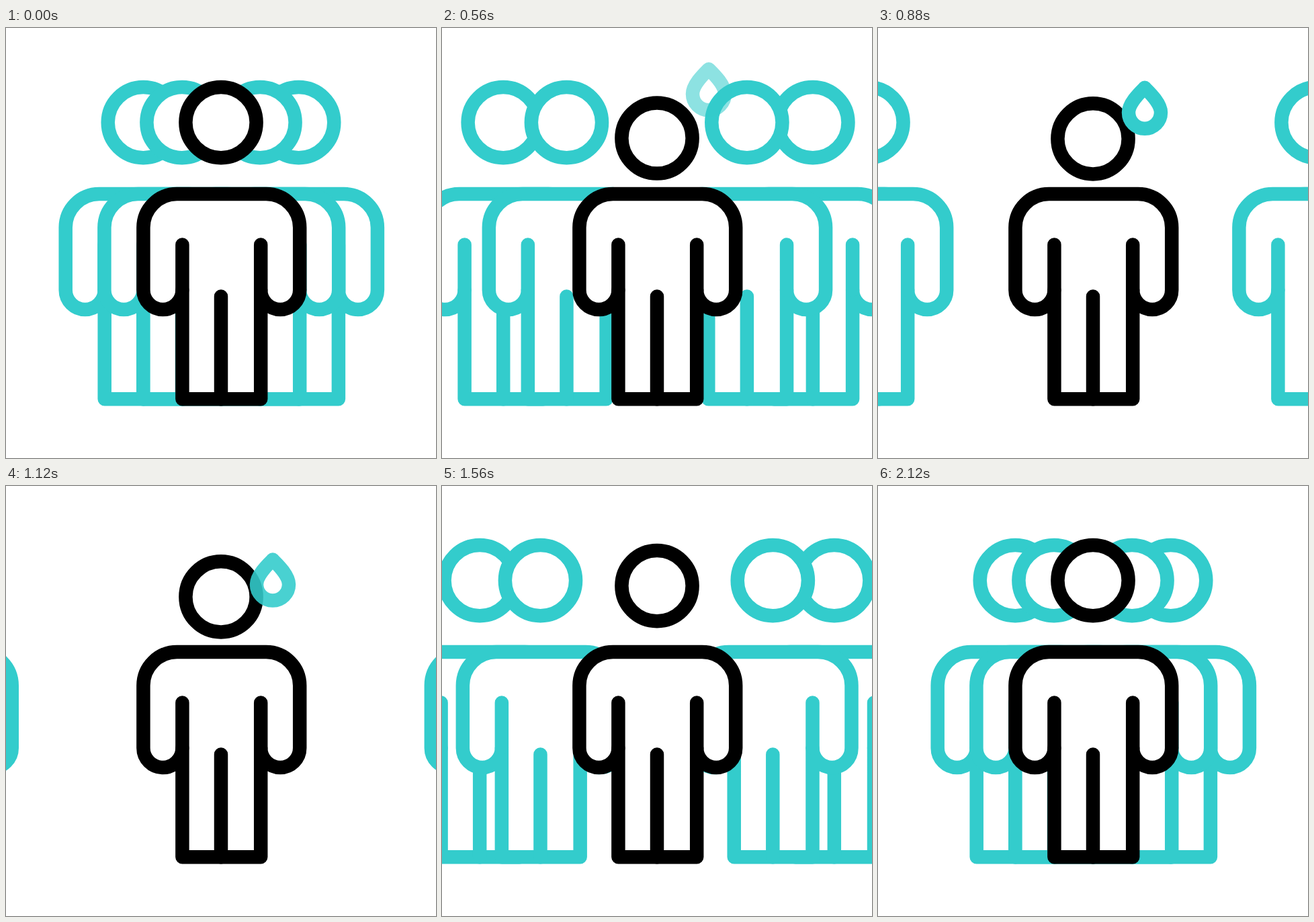
These frames come from a looping animation (640x640 px, 2.2 s). An HTML page:

```html
<!DOCTYPE html>
<html lang="en">
<head>
<meta charset="utf-8">
<title>Stepping away</title>
<style>
  html, body { margin: 0; width: 100%; height: 100%; overflow: hidden; background: #fff; }
  svg { display: block; width: 100%; height: 100%; fill: #fff; stroke: #33cccc;
        stroke-width: 20.5; stroke-linecap: round; stroke-linejoin: round; }
  #leader { stroke: #000; }
  #drop { fill: none; }
</style>
</head>
<body>
<svg viewBox="0 0 640 640">
  <defs>
    <circle id="head" cx="320" cy="140.6" r="52.6"/>
    <g id="body">
      <path d="M262.4 390A29 29 0 0 1 204.4 390V297A50 50 0 0 1 254.4 247H387.2A50 50 0 0 1 437.2 297V390A29 29 0 0 1 379.2 390V552.2H262.4Z"/>
      <path d="M262.4 322.5V390M379.2 322.5V390M320 399.5V552.2"/>
    </g>
    <g id="person"><use href="#head"/><use href="#body"/></g>
  </defs>
  <use id="outerLeft" href="#person"/>
  <use id="outerRight" href="#person"/>
  <use id="innerLeft" href="#person"/>
  <use id="innerRight" href="#person"/>
  <g id="leader"><use id="leaderHead" href="#head"/><use href="#body"/></g>
  <g id="drop"><path d="M397 75C404 82 421 98 421 112A24 24 0 0 1 373 112C373 98 390 82 397 75Z"/></g>
</svg>
<script>
const LOOP = 2200, STEP = 40;
const $ = id => document.getElementById(id);
const clamp = v => Math.max(0, Math.min(1, v));

// Smooth curve through [time, value] points, without overshoot.
function track(...pts) {
  const rise = pts.slice(1).map(([t, v], i) => (v - pts[i][1]) / (t - pts[i][0]));
  const slope = pts.map((_, i) => {
    const a = rise[i - 1] || 0, b = rise[i] || 0;
    return a * b > 0 ? 2 * a * b / (a + b) : 0;
  });
  return t => {
    const last = pts.length - 1;
    if (t <= pts[0][0]) return pts[0][1];
    if (t >= pts[last][0]) return pts[last][1];
    const i = pts.findIndex(p => p[0] > t) - 1;
    const [t0, v0] = pts[i], [t1, v1] = pts[i + 1];
    const d = t1 - t0, u = (t - t0) / d, w = 1 - u;
    return v0 + (v1 - v0) * u * u * (3 - 2 * u)
      + d * u * w * (w * slope[i] - u * slope[i + 1]);
  };
}

const outer = mid => track([100, 115.7], [360, 149.5], [720, mid], [1100, 440],
  [1760, 169], [1800, 156], [2100, 115.7]);
const inner = (a, b, c) => track([100, 58], [360, 72], [720, a], [880, b], [1100, 430],
  [1360, c], [1800, 73.5], [2100, 58]);

const walkers = [
  ["outerLeft", -1, outer(305)],
  ["outerRight", 1, outer(310)],
  ["innerLeft", -1, inner(217, 335, 295)],
  ["innerRight", 1, inner(215.5, 333, 293)]
];
const nod = track([100, 0], [620, 24.3], [1240, 24.3], [1760, 0]);

function draw(t) {
  for (const [id, side, offset] of walkers)
    $(id).setAttribute("transform", `translate(${side * offset(t)} 0)`);
  $("leaderHead").setAttribute("transform", `translate(0 ${nod(t)})`);
  $("drop").setAttribute("transform", `translate(0 ${(t - 720) * 0.0865})`);
  $("drop").setAttribute("opacity", clamp(Math.min(t - 360, 1440 - t) / 360));
}

const start = performance.now();
function tick() {
  const t = (performance.now() - start) % LOOP;
  draw(Math.floor(t / STEP) * STEP);
  requestAnimationFrame(tick);
}
tick();
</script>
</body>
</html>
```
